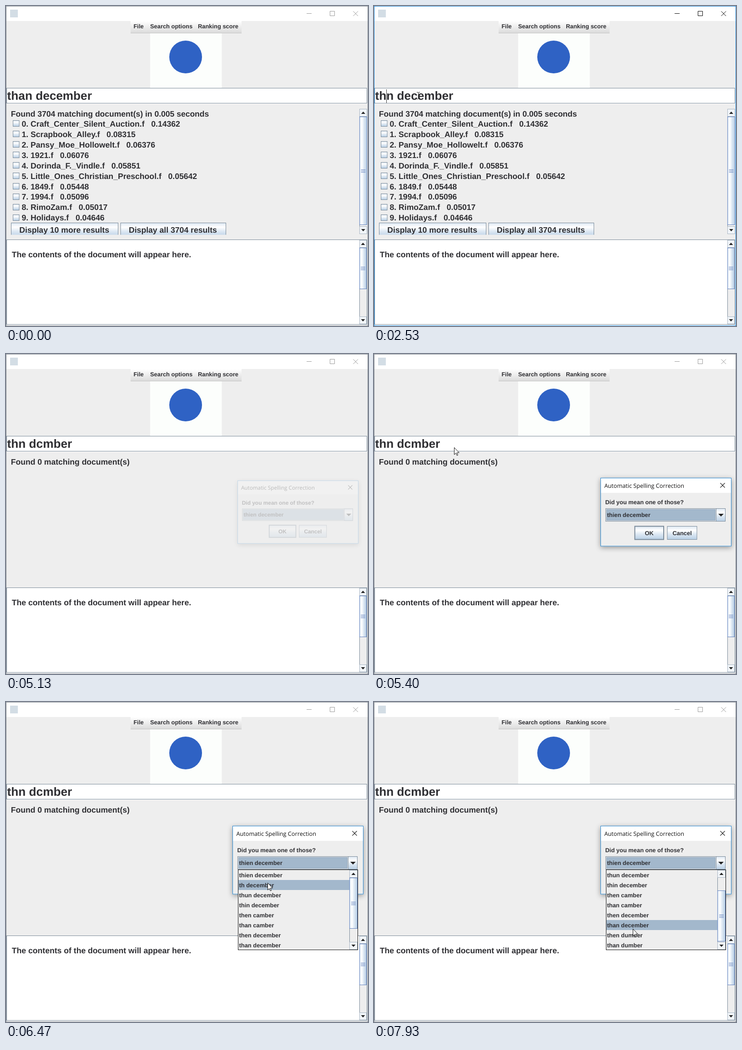
Write an HTML page that moves like this. It is 796x703 px and loops after 8 s.

```html
<!DOCTYPE html>
<html lang="en">
<head>
<meta charset="utf-8">
<title>Document search with spelling correction</title>
<style>
  html, body { margin: 0; width: 100%; height: 100%; overflow: hidden; background: #eee; }
  svg { display: block; width: 796px; height: 703px; }
  text { font: bold 12.9px "Liberation Sans", Arial, sans-serif; fill: #2f2f33; white-space: pre; text-rendering: geometricPrecision; }
  .big { font-size: 17.63px; }
  .found { font-size: 17.55px; }
  .query { font-size: 26.2px; }
  .title { font: 12.7px "Open Sans", "Noto Sans", sans-serif; fill: #111; }
  .line { fill: none; stroke: #7a8a99; }
  .btn { fill: url(#down); stroke: #7a8a99; }
  .thumb { fill: url(#across); stroke: #6382bf; }
  .grip { stroke: #6382bf; }
  .pick { fill: #a3b8cc; }
  .shade { filter: drop-shadow(0 3px 6px rgba(0, 0, 0, .38)); }
</style>
</head>
<body>
<svg viewBox="0 0 796 703" xmlns="http://www.w3.org/2000/svg">
  <defs>
    <linearGradient id="down" x2="0" y2="1">
      <stop stop-color="#dde8f3"/><stop offset=".3" stop-color="#fff"/>
      <stop offset=".6" stop-color="#dde8f3"/><stop offset="1" stop-color="#b8cfe5"/>
    </linearGradient>
    <linearGradient id="across">
      <stop stop-color="#dde8f3"/><stop offset=".3" stop-color="#fff"/>
      <stop offset=".6" stop-color="#dde8f3"/><stop offset="1" stop-color="#b8cfe5"/>
    </linearGradient>
    <linearGradient id="bar" x2="0" y2="1">
      <stop stop-color="#fff"/><stop offset="1" stop-color="#dadada"/>
    </linearGradient>
    <clipPath id="view"><path d="M1 216H777V502.5H1Z"/></clipPath>
  </defs>

  <rect width="796" height="703" fill="#eee"/>
  <rect width="796" height="33" fill="#fff"/>
  <rect x="9" y="8" width="17" height="17" fill="#d3dde5"/>
  <path id="controls" fill="none" d="M661 16.5H672M712.5 11.5H722.5V21.5H712.5ZM763.5 11.5L774 22M774 11.5L763.5 22"/>

  <rect x="274" y="33" width="244" height="27" fill="url(#bar)"/>
  <path d="M274 59.5H518" stroke="#c4c4c4"/>
  <text x="280.5" y="49">File</text>
  <text x="317" y="49">Search options</text>
  <text x="422" y="49">Ranking score</text>

  <rect x="317" y="60" width="157.5" height="120" fill="#fcfefc"/>
  <circle cx="395" cy="112" r="36" fill="#2f62c4"/>

  <rect x="1" y="180" width="794" height="35" fill="#fff"/>
  <rect class="line" x="1.5" y="180.5" width="792" height="33"/>
  <text id="query" class="query" x="2.6" y="206"></text>
  <rect id="caret" y="183" width="1" height="30" fill="#333"/>

  <text id="found" class="found" x="10.8" y="243"></text>
  <g id="results"></g>

  <rect x="1" y="514" width="794" height="188" fill="#fff"/>
  <rect class="line" x="1.5" y="513.5" width="792" height="186"/>
  <text class="big" x="12.8" y="551.7">The contents of the document will appear here.</text>
  <g id="page"></g>
  <rect id="frame" x=".5" y=".5" width="795" height="702" fill="none"/>

  <g id="dialog">
    <rect class="shade" x="498" y="272" width="288" height="150.5" fill="#eee"/>
    <rect x="499" y="273" width="286" height="32" fill="#fff"/>
    <rect x="498.5" y="272.5" width="287" height="149.5" fill="none" stroke="#2a8ad4"/>
    <text class="title" x="506.5" y="294">Automatic Spelling Correction</text>
    <path d="M761.5 283.5L771.5 293.5M771.5 283.5L761.5 293.5" stroke="#111" stroke-width="1.1"/>
    <text x="508.5" y="329.5">Did you mean one of those?</text>
    <rect x="509.5" y="339.5" width="263" height="28" fill="#eee" stroke="#7a8a99"/>
    <rect class="pick" x="511.5" y="341.5" width="239" height="24" stroke="#8fa6bd"/>
    <rect class="btn" x="752.5" y="339.5" width="20" height="28"/>
    <path d="M757 351H769L763 357Z" fill="#222"/>
    <text x="512.5" y="357.5">thien december</text>
    <rect class="btn" x="573.5" y="378.5" width="63.5" height="29" stroke-width="2"/>
    <rect class="btn" x="645" y="378.5" width="65" height="29"/>
    <text x="595.5" y="398">OK</text>
    <text x="656.5" y="398">Cancel</text>
  </g>

  <g id="popup">
    <rect x="510.5" y="368.5" width="263" height="176" fill="#eee" stroke="#111"/>
    <rect id="pick" class="pick" x="511" width="244" height="22"/>
    <g id="items"></g>
    <g id="slider"></g>
  </g>

  <path id="beam" fill="none" stroke="#222" d="M-3.5-7.5H-1.5L0-6.5L1.5-7.5H3.5M0-6.5V6.5M-3.5 7.5H-1.5L0 6.5L1.5 7.5H3.5"/>
  <path id="arrow" fill="#fff" stroke="#111" d="M.5 .5V16L4 12.7L6.4 18L8.5 17.1L6.2 11.9H11.2Z"/>
</svg>
<script>
const $ = id => document.getElementById(id);
const LOOP = 8000;

const docs = [
  ["Craft_Center_Silent_Auction", "0.14362"], ["Scrapbook_Alley", "0.08315"],
  ["Pansy_Moe_Hollowelt", "0.06376"], ["1921", "0.06076"],
  ["Dorinda_F._Vindle", "0.05851"], ["Little_Ones_Christian_Preschool", "0.05642"],
  ["1849", "0.05448"], ["1994", "0.05096"], ["RimoZam", "0.05017"], ["Holidays", "0.04646"]
];
const guesses = ["thien december", "th december", "thun december", "thin december", "then camber",
  "than camber", "then december", "than december", "then dumber", "than dumber"];

function scrollbar(x, y, w, h, top, bottom) {
  const mid = (top + bottom) / 2, cx = x + w / 2, end = y + h;
  const button = by => `<rect x="${x + .5}" y="${by + .5}" width="${w - 1}" height="16" fill="#f1f5f9" stroke="#a9b6c3"/>`;
  const grips = [-3, 0, 3].map(d =>
    `<path class="grip" d="M${cx - 5} ${Math.floor(mid + d) + .5}h10"/>`).join("");
  return `<rect x="${x}" y="${y}" width="${w}" height="${h}" fill="#eee"/>
    <path class="line" d="M${x + .5} ${y}V${end}"/>
    ${button(y)}${button(end - 17)}
    <path d="M${cx - 4.5} ${y + 11}h9l-4.5-5zM${cx - 4.5} ${end - 11}h9l-4.5 5z" fill="#222"/>
    <rect class="thumb" x="${x + .5}" y="${top + .5}" width="${w - 1}" height="${bottom - top - 1}"/>${grips}`;
}

const gap = "\u00a0".repeat(3);
const rows = docs.map(([name, score], i) => {
  const y = 258.5 + 22.95 * i;
  return `<rect class="btn" x="15.5" y="${Math.floor(y - 7) + .5}" width="13.5" height="13"/>
    <text class="big" x="34.5" y="${y + 6.3}">${i}. ${name}.f${gap}${score}</text>`;
}).join("");
$("results").innerHTML = `<g clip-path="url(#view)">${rows}
  <rect class="btn" x="11.5" y="476.5" width="235" height="31"/>
  <rect class="btn" x="252" y="476.5" width="231.5" height="31"/>
  <text class="big" x="29.3" y="498.3">Display 10 more results</text>
  <text class="big" x="270" y="498.3">Display all 3704 results</text></g>
  ${scrollbar(777, 226, 17, 275, 243, 481)}`;
$("page").innerHTML = scrollbar(777, 514, 16, 185, 531, 622);

// [from, value]: the last entry already reached applies
const queries = [[0, "than december"], [2200, "thn december"], [3070, "thn dcember"], [3800, "thn dcmber"]];
const carets = [[0], [1200, 42], [1670], [2130, 42], [2200, 27], [2730], [2870, 80],
  [3070, 65], [3530, 94], [3800, 80], [4200, 145], [4730]];

// [from, to, x0, y0, x1, y1]; no point means the pointer is hidden
const moves = [
  [0], [400, 930, 693, 121, 49, 197], [2200],
  [2530, 2670, 97, 197, 86, 198], [2800, 2870, 86, 198, 85, 198], [3070],
  [3200, 3270, 88, 198, 91, 198], [3800],
  [3930, 4130, 98, 198, 178, 205], [5070],
  [5200, 5270, 176, 205, 176, 205], [5400, 5870, 176, 205, 600, 360],
  [5870, 6070, 600, 360, 588, 356], [6330, 6470, 588, 356, 575, 397],
  [6470, 6530, 575, 397, 574, 397], [6670, 7070, 574, 397, 569, 498]
];

const at = (list, t) => list.findLast(e => e[0] <= t);
const show = (id, on) => $(id).setAttribute("visibility", on ? "visible" : "hidden");
const put = (id, attrs) => { for (const k in attrs) $(id).setAttribute(k, attrs[k]); };

function pointer(t) {
  const [from, to, x0, y0, x1, y1] = at(moves, t);
  if (x0 === undefined) return null;
  const p = Math.min(1, (t - from) / (to - from)), e = p * p * (3 - 2 * p);
  return { x: Math.round(x0 + (x1 - x0) * e), y: Math.round(y0 + (y1 - y0) * e) };
}

// the picture changes 15 times a second
function step(t) {
  const tick = k => Math.round(k * 20 / 3) * 10;
  let k = Math.floor((t + 5) * .015);
  if (tick(k) > t) k--;
  return tick(k);
}

let shift = -1;
function scrollList(n) {
  if (n === shift) return;
  shift = n;
  $("items").innerHTML = guesses.slice(n, n + 8).map((s, i) =>
    `<text x="512.5" y="${384.5 + 22 * i}">${s}</text>`).join("");
  $("slider").innerHTML = scrollbar(755, 369, 18, 175, 386 + 14 * n, 498 + 14 * n);
}

function draw(t) {
  const active = t >= 1130 && t < 5130, searched = t >= 5070;
  put("frame", { stroke: active ? "#1883d7" : "#858c94" });
  put("controls", { stroke: active ? "#000" : "#999" });
  $("query").textContent = at(queries, t)[1];
  $("found").textContent = searched ? "Found 0 matching document(s)"
    : "Found 3704 matching document(s) in 0.005 seconds";
  show("results", !searched);

  const caret = at(carets, t)[1];
  show("caret", caret !== undefined);
  if (caret) put("caret", { x: caret });

  const grow = Math.max(0, Math.min(1, (t - 5070) / 260)), s = .9 + .1 * grow;
  show("dialog", grow > 0);
  put("dialog", { opacity: grow, transform: `translate(${642 * (1 - s)} ${347 * (1 - s)}) scale(${s})` });

  const pos = pointer(t);
  const open = t >= 6070;
  show("popup", open);
  scrollList(t >= 7270 ? 2 : 0);
  if (open) {
    const over = Math.max(0, Math.floor((pos.y - 369) / 22));
    const row = t >= 7270 && t < 7870 ? 3 : over;
    put("pick", { y: 369 + 22 * row });
  }

  const typing = pos && !searched && pos.y > 181;
  show("beam", typing);
  show("arrow", pos && !typing);
  if (pos) put(typing ? "beam" : "arrow", {
    transform: `translate(${pos.x + (typing ? .5 : 0)} ${pos.y})`
  });
}

const start = performance.now();
function loop(now) {
  draw(step(Math.max(0, now - start) % LOOP));
  requestAnimationFrame(loop);
}
draw(0);
requestAnimationFrame(loop);
</script>
</body>
</html>
```
